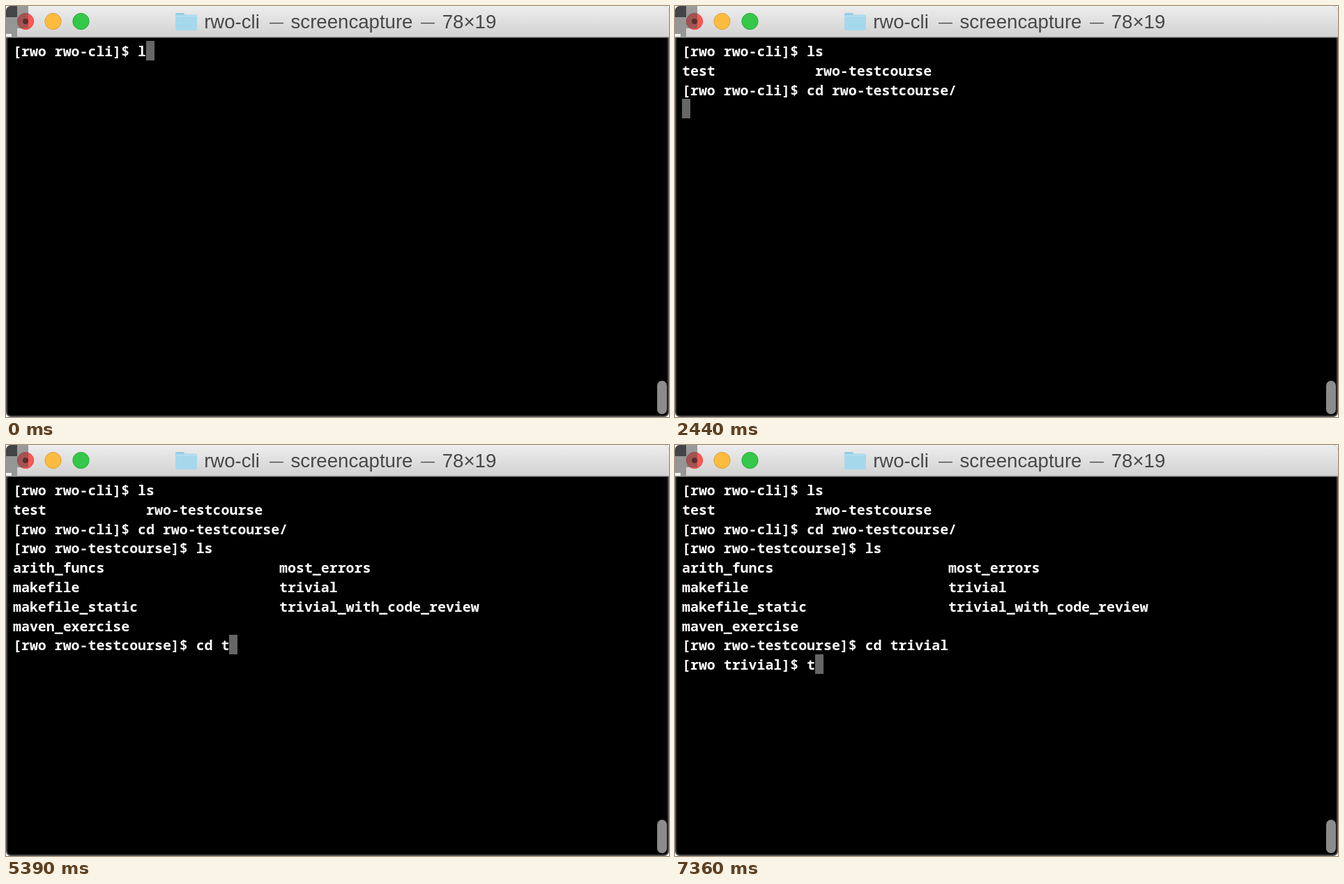
Recreate the animation shown at these times as an HTML page with a canvas. Size 951x589 px, loop 8000 ms.

```html
<!DOCTYPE html>
<html lang="en">
<head>
<meta charset="utf-8">
<title>Terminal session</title>
<style>
  html, body { margin: 0; width: 100%; height: 100%; overflow: hidden; background: #fff; }
  canvas { display: block; }
</style>
</head>
<body>
<canvas id="stage" width="951" height="589"></canvas>
<script>
const ctx = document.getElementById('stage').getContext('2d');
const W = 951, H = 589, LOOP = 8000;
const CELL = 11.94, LINE = 27.8, LEFT = 10, TOP = 50;
const SANS = '"Liberation Sans", Arial, sans-serif';
const MONO = '600 19.9px "Noto Sans Mono", "DejaVu Sans Mono", monospace';

const prompt = dir => `[rwo ${dir}]$ `;
const columns = (rows, width) =>
  rows.map(([a, b = '']) => (b ? a.padEnd(width) + b : a) + '\n').join('');

const listing = columns([
  ['arith_funcs', 'most_errors'],
  ['makefile', 'trivial'],
  ['makefile_static', 'trivial_with_code_review'],
  ['maven_exercise']
], 32);

// Output appended to the terminal: [ms, text]
const output = [
  [0, prompt('rwo-cli') + 'l'], [500, 's'], [750, '\n'],
  [850, columns([['test', 'rwo-testcourse']], 16)],
  [950, prompt('rwo-cli')], [1060, 'c'], [1590, 'd'], [1670, ' '],
  [1960, 'r'], [2260, 'w'], [2300, 'o-testcourse/'], [2440, '\n'],
  [3100, prompt('rwo-testcourse')], [3200, 'l'], [3620, 's'], [3690, '\n'],
  [4110, listing], [4210, prompt('rwo-testcourse')], [4310, 'c'],
  [5190, 'd'], [5230, ' '], [5390, 't'], [6240, 'r'],
  [6420, 'ivial'], [6520, '\n'],
  [7260, prompt('trivial')], [7360, 't']
];

function rect(x, y, w, h, fill) {
  ctx.fillStyle = fill;
  ctx.fillRect(x, y, w, h);
}

function round(x, y, w, h, r, fill) {
  ctx.fillStyle = fill;
  ctx.beginPath();
  ctx.roundRect(x, y, w, h, r);
  ctx.fill();
}

function button(x, fill, edge) {
  ctx.beginPath();
  ctx.arc(x, 22, 11.6, 0, Math.PI * 2);
  ctx.fillStyle = fill;
  ctx.fill();
  ctx.strokeStyle = edge;
  ctx.lineWidth = 1;
  ctx.stroke();
}

function drawTitle(process, left) {
  round(left, 10, 13, 8, 2, '#8fcbe3');
  round(left, 12.5, 31, 22.5, 2, '#a6d8ec');
  rect(left + 1, 14, 29, 1, '#bfe4f2');

  const right = W - 5 - left;
  ctx.fillStyle = '#484848';
  ctx.textAlign = 'center';
  ctx.font = '27.6px ' + SANS;
  ctx.fillText('rwo-cli', left + 81, 32);
  ctx.fillText(process, (left + right) / 2 + 23, 32);
  ctx.fillText('78×19', right - 38.5, 32);
  ctx.font = '20px ' + SANS;
  ctx.fillText('—', left + 145, 30);
  ctx.fillText('—', right - 98, 30);
}

function drawWindow() {
  rect(0, 0, W, H, '#fff');
  round(0, 0, W, H, 7, '#4c4c4c');
  round(2, 40, W - 4, H - 42, [0, 0, 5, 5], '#000');

  const bar = ctx.createLinearGradient(0, 0, 0, 44);
  bar.addColorStop(0, '#ededed');
  bar.addColorStop(1, '#d2d2d2');
  round(0, 0, W, 44, [7, 7, 0, 0], bar);
  rect(6, 0, W - 12, 1, '#f6f6f6');
  rect(0, 44, W, 1.5, '#9a9a9a');

  button(28, '#fc5753', '#df4744');
  button(67.5, '#fdbc40', '#de9f34');
  button(107.5, '#34c84a', '#27aa35');
  ctx.fillStyle = '#5c0d0b';
  ctx.beginPath();
  ctx.arc(28, 22, 4, 0, Math.PI * 2);
  ctx.fill();

  // Shaded blocks in the top left corner
  round(0, 0, 16, 16, [7, 0, 0, 0], '#444446');
  rect(16, 0, 16, 32, 'rgba(82,82,82,.52)');
  rect(0, 16, 16, 24, '#969696');
  rect(8, 40, 8, 4, '#969696');
  rect(0, 40, 8, 4, '#f2f2f2');

  round(934, 537, 14, 48, 7, '#8c8c8c');
}

function drawTerminal(text) {
  const lines = text.split('\n');
  const last = lines.length - 1;
  const x0 = Math.round(LEFT + lines[last].length * CELL);
  const y0 = Math.round(TOP + last * LINE);
  rect(x0, y0, 12, 28, '#666');

  ctx.font = MONO;
  ctx.textAlign = 'left';
  ctx.fillStyle = '#fff';
  lines.forEach((line, row) => {
    const y = Math.round(TOP + row * LINE) + 22;
    [...line].forEach((ch, col) => {
      if (ch !== ' ') ctx.fillText(ch, LEFT + col * CELL, y);
    });
  });
}

function draw(t) {
  drawWindow();
  if (t >= 6240 && t < 6420) drawTitle('osascript', 273);
  else drawTitle('screencapture', 243);
  drawTerminal(output.filter(([at]) => at <= t).map(([, s]) => s).join(''));
}

const start = performance.now();
function tick() {
  draw((performance.now() - start) % LOOP);
  requestAnimationFrame(tick);
}
tick();
</script>
</body>
</html>
```
